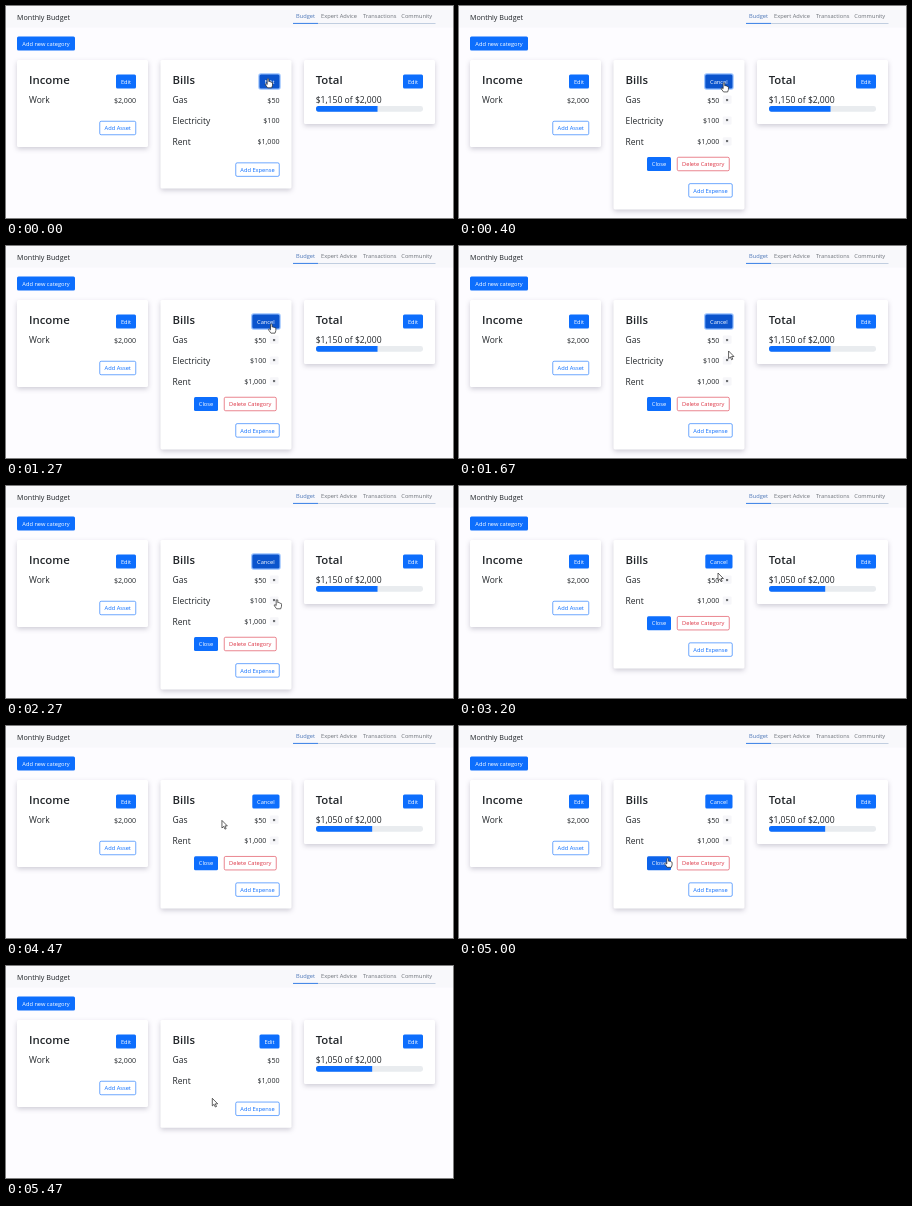
Write an HTML page that moves like this. It is 447 px wide and 212 px high and loops after 6.07 s.

```html
<!DOCTYPE html>
<html lang="en">
<head>
<meta charset="utf-8">
<title>Monthly Budget</title>
<style>
  html, body { margin: 0; width: 100%; height: 100%; overflow: hidden; background: #fdfcff; }
  svg { display: block; width: 447px; height: 212px; }
  text { font-family: "Open Sans", "Noto Sans", sans-serif; fill: #212529; white-space: pre; }
  .card { fill: #fff; filter: drop-shadow(0 2.9px 2.9px rgba(20, 15, 50, .2)); }
</style>
</head>
<body>
<svg id="stage" viewBox="0 0 447 212">
  <g id="fixed"></g>
  <g id="bills"></g>
  <g id="total"></g>
  <g id="cursor">
    <path id="arrow" d="M0 0V7.6L1.8 6L3 8.7L4.2 8.2L3 5.5H5.4Z"
      fill="#fff" stroke="#222" stroke-width=".7" stroke-linejoin="round"/>
    <path id="hand" d="M-.8 .6Q0-.4 .8 .6V3.2Q1.6 2.7 2.1 3.4Q2.9 3 3.4 3.8Q4.5 3.6 4.5 4.8V6.8L3.7 9.3H-.4L-2.6 6.3Q-3.1 5.2-2 5.1L-.8 6Z"
      fill="#fff" stroke="#222" stroke-width=".7" stroke-linejoin="round"/>
  </g>
</svg>
<script>
const LOOP = 6070;
const OPEN = 130, REMOVE = 2670, CLOSE = 5270;
const BLUE = '#0d6efd', RED = '#dc3545', ROW = 20.8;
const $ = id => document.getElementById(id);

// time, x, y of the pointer tip
const PATH = [
  [0, 262, 72.5], [70, 262, 72.5], [470, 265.2, 77], [1210, 265.2, 77],
  [1870, 270.8, 112.8], [1930, 271, 113.5], [2870, 271, 113.5],
  [3200, 259, 87], [3530, 216.3, 92.5], [4400, 216.3, 92.5],
  [4930, 209, 131.5], [5000, 208.6, 132], [5130, 206.3, 132.3], [LOOP, 206.3, 132.3]
];

const clamp = v => Math.min(1, Math.max(0, v));
const mix = (a, b, p) => a + (b - a) * p;
const smooth = p => p * p * (3 - 2 * p);

// The CSS "ease" curve
function ease(p) {
  let lo = 0, hi = 1, s = p;
  for (let i = 0; i < 16; i++) {
    s = (lo + hi) / 2;
    const x = .75 * s * (1 - s) + s ** 3;
    if (x < p) lo = s; else hi = s;
  }
  return .3 * s * (1 - s) ** 2 + 3 * s * s * (1 - s) + s ** 3;
}

function shade(p) {
  return `rgb(${mix(13, 11, p)},${mix(110, 84, p)},${mix(253, 205, p)})`;
}

function pointer(t) {
  const i = PATH.findIndex(k => k[0] > t);
  const [t0, x0, y0] = PATH[i - 1], [t1, x1, y1] = PATH[i];
  const p = smooth((t - t0) / (t1 - t0));
  return [mix(x0, x1, p), mix(y0, y1, p)];
}

function text(str, x, y, size, opts = '') {
  return `<text x="${x}" y="${y}" font-size="${size}" ${opts}>${str}</text>`;
}
const right = (str, x, y) => text(str, x, y, 7.1, 'text-anchor="end"');
const title = (str, x) => text(str, x, 78, 11.4, 'font-weight="600"');

function card(x, bottom) {
  return `<rect class="card" x="${x}" y="54" width="131" height="${bottom - 54}" rx="1.6"/>`;
}

function label(str, x, y, w, color) {
  return text(str, x + w / 2, y + 9.1, 5.7, `text-anchor="middle" style="fill:${color}"`);
}

function solid(str, x, y, w, fill = BLUE, ring = 0) {
  const glow = ring
    ? `<rect x="${x - 1.2}" y="${y - 1.2}" width="${w + 2.4}" height="16.4" rx="2.6" fill="#3184fd" opacity="${ring * .5}"/>`
    : '';
  return `${glow}<rect x="${x}" y="${y}" width="${w}" height="14" rx="1.5" fill="${fill}"/>`
    + label(str, x, y, w, '#fff');
}

function outline(str, x, y, w, color = BLUE) {
  return `<rect x="${x + .25}" y="${y + .25}" width="${w - .5}" height="13.5" rx="1.4" fill="#fff" stroke="${color}" stroke-width=".6"/>`
    + label(str, x, y, w, color);
}

function fixed() {
  const nav = [['Expert Advice', 315], ['Transactions', 357], ['Community', 395.3]];
  return '<rect width="447" height="21.5" fill="#f8f8fb"/>'
    + text('Monthly Budget', 11, 13.6, 7.15)
    + text('Budget', 290, 12.4, 5.7, 'style="fill:#4d77b8"')
    + nav.map(([s, x]) => text(s, x, 12.4, 5.7, 'style="fill:#6c7178"')).join('')
    + '<rect x="287" y="17.2" width="142.5" height=".7" fill="#a9bcd6"/>'
    + '<rect x="287" y="16.9" width="25" height="1" fill="#3b82e8"/>'
    + solid('Add new category', 11, 30.5, 58)
    + card(11, 141) + title('Income', 23) + solid('Edit', 110, 68.5, 20)
    + text('Work', 23, 97, 8.5) + right('$2,000', 130, 96.6)
    + outline('Add Asset', 93.5, 115, 36.5)
    + card(298, 118) + title('Total', 309.7) + solid('Edit', 397, 68.5, 20);
}

function bills(t) {
  const editing = t >= OPEN && t < CLOSE;
  const rows = [['Gas', '$50'], ['Electricity', '$100'], ['Rent', '$1,000']];
  if (t >= REMOVE) rows.splice(1, 1);
  const shift = (rows.length - 1) * ROW;
  const extra = editing ? ROW : 0;
  const focus = t < CLOSE ? 1 - clamp((t - REMOVE + 80) / 150) : 0;
  const hover = clamp((t - 4900) / 150);

  let out = card(154.5, 141 + shift + extra) + title('Bills', 166.5);
  out += editing
    ? solid('Cancel', 246.3, 68.5, 27.2, shade(focus), focus)
    : solid('Edit', 253.5, 68.5, 20, shade(focus), focus);
  rows.forEach(([name, sum], i) => {
    const y = 97 + i * ROW;
    out += text(name, 166.5, y, 8.5) + right(sum, editing ? 260.3 : 273.5, y - .4);
    if (editing) {
      out += `<rect x="263.8" y="${y - 7.4}" width="8.8" height="8.2" rx="1.2" fill="#f6f6f9"/>`
        + text('×', 268.2, y - 1.5, 5.6, 'text-anchor="middle" font-weight="700"');
    }
  });
  if (editing) {
    const y = 109.4 + shift;
    out += solid('Close', 188, y, 24, shade(hover * .6))
      + outline('Delete Category', 218, y, 52.5, RED);
  }
  return out + outline('Add Expense', 229.5, 115 + shift + extra, 44);
}

function total(t) {
  const p = ease(clamp((t - REMOVE) / 600));
  const w = 107 * mix(.575, .525, p);
  return text(`${t < REMOVE ? '$1,150' : '$1,050'} of $2,000`, 309.7, 96.8, 8.6)
    + '<rect x="310" y="100" width="107" height="5.7" rx="2.4" fill="#e9ecef"/>'
    + `<path d="M312.4 100H${310 + w}V105.7H312.4A2.4 2.85 0 0 1 312.4 100Z" fill="${BLUE}"/>`;
}

function overButton(t, x, y) {
  const inside = (l, top, w, h) => x >= l && x <= l + w && y >= top && y <= top + h;
  const editing = t >= OPEN && t < CLOSE;
  if (inside(editing ? 246.3 : 253.5, 68.5, editing ? 27.2 : 20, 14)) return true;
  if (!editing) return false;
  const count = t < REMOVE ? 3 : 2;
  for (let i = 0; i < count; i++) {
    if (inside(263.8, 89.6 + i * ROW, 8.8, 8.2)) return true;
  }
  return inside(188, 109.4 + (count - 1) * ROW, 24, 14);
}

function draw(now) {
  const t = now % LOOP;
  const [x, y] = pointer(t);
  const hand = overButton(t, x, y);
  $('bills').innerHTML = bills(t);
  $('total').innerHTML = total(t);
  $('cursor').setAttribute('transform', `translate(${x} ${y})`);
  $('hand').style.display = hand ? '' : 'none';
  $('arrow').style.display = hand ? 'none' : '';
}

$('fixed').innerHTML = fixed();
const start = performance.now();
function tick() {
  draw(performance.now() - start);
  requestAnimationFrame(tick);
}
tick();
</script>
</body>
</html>
```
